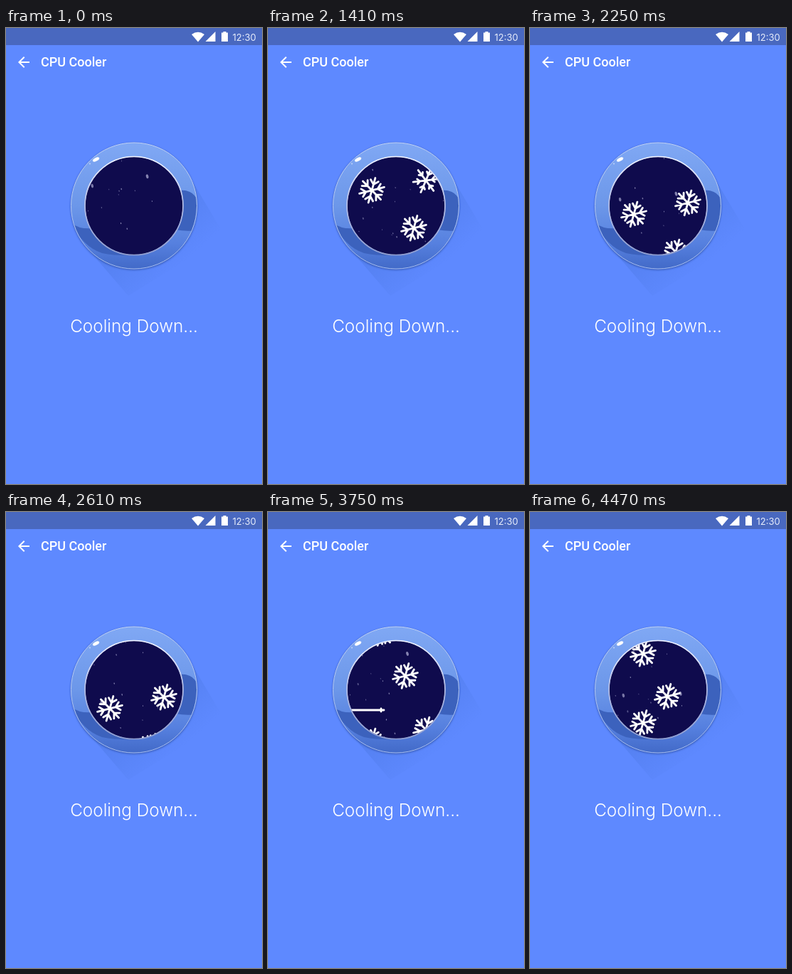
Write an HTML page with a canvas that moves like this. It is 360 px wide and 640 px high and loops after 4.5 s.

```html
<!DOCTYPE html>
<html lang="en">
<head>
<meta charset="utf-8">
<title>CPU Cooler</title>
<style>
  html, body { margin: 0; width: 100%; height: 100%; overflow: hidden; background: #5e89ff; }
  svg, canvas { position: absolute; left: 0; top: 0; width: 360px; height: 640px; }
  text { fill: #fff; }
  .clock { font: 400 13px Inter, sans-serif; fill: #e6ecfb; }
  .title { font: 500 18px Roboto, sans-serif; }
  .state { font: 300 24.3px Inter, sans-serif; text-anchor: middle; }
</style>
</head>
<body>
<svg viewBox="0 0 360 640">
  <defs>
    <linearGradient id="shade" gradientUnits="userSpaceOnUse" x1="205" y1="275" x2="252" y2="328">
      <stop offset="0" stop-color="#4774dc" stop-opacity=".36"/>
      <stop offset="1" stop-color="#4774dc" stop-opacity="0"/>
    </linearGradient>
    <linearGradient id="glass" x1="0" y1="0" x2="0" y2="1">
      <stop offset="0" stop-color="#80a8f4"/>
      <stop offset=".5" stop-color="#6c97e9"/>
      <stop offset=".8" stop-color="#5680df"/>
      <stop offset="1" stop-color="#426ac8"/>
    </linearGradient>
    <linearGradient id="edge" x1="0" y1="0" x2="0" y2="1">
      <stop offset="0" stop-color="#c2d4f6"/>
      <stop offset="1" stop-color="#a4bbee"/>
    </linearGradient>
    <clipPath id="dish"><circle cx="180" cy="249.5" r="88"/></clipPath>
    <filter id="soft"><feGaussianBlur stdDeviation=".7"/></filter>
    <filter id="drop" x="-10%" y="-10%" width="120%" height="120%"><feGaussianBlur stdDeviation="1.2"/></filter>
  </defs>
  <rect width="360" height="640" fill="#5e89ff"/>
  <rect width="360" height="24" fill="#4968bf"/>
  <g fill="#fff">
    <path d="M261 9Q270 2.500 279 9L270 19.500Z"/>
    <path d="M294.500 5V19H280.500Z"/>
    <path d="M303 6.500h2.500V5h4v1.500h2.500V19h-9Z"/>
    <path transform="translate(13 36)" d="M20 11H7.830l5.590-5.590L12 4l-8 8 8 8 1.410-1.410L7.830 13H20z"/>
  </g>
  <text class="clock" x="318.500" y="18">12:30</text>
  <text class="title" x="49" y="54">CPU Cooler</text>
  <path d="M250 195L308 292L172 376L116 311Z" fill="url(#shade)"/>
  <circle cx="180" cy="250.500" r="89.500" fill="#2c4c9c" opacity=".6" filter="url(#drop)"/>
  <circle cx="180" cy="249.500" r="88.500" fill="url(#glass)"/>
  <g clip-path="url(#dish)" fill="#3c62bd">
    <path d="M92 274Q104 283 122 281L180 319Q155 320 135 316Q108 307 92 274Z"/>
    <path d="M243 228Q264 226 270 244V284Q255 286 238 283Z"/>
  </g>
  <circle cx="180" cy="249.500" r="88.500" fill="none" stroke="url(#edge)"/>
  <g fill="#fff" filter="url(#soft)">
    <ellipse cx="126.500" cy="184.500" rx="5" ry="2.400" transform="rotate(-28 126.500 184.500)"/>
    <circle cx="118" cy="190.500" r=".9" opacity=".6"/>
  </g>
  <text class="state" x="180" y="427">Cooling Down...</text>
</svg>
<canvas id="view" width="360" height="640"></canvas>
<script>
const LOOP = 4500, CX = 180, CY = 249.5, R = 68.5, TAU = Math.PI * 2;
const FALL = 0.04, ARM = 18, TILT = -0.25, REACH = 62;
const ctx = document.getElementById('view').getContext('2d');

// side: where the streak enters from, 0 = falls in from above
const flakes = [
  { x: 205, y: 246, start: 540, side: 1 },
  { x: 146, y: 214, start: 1065, side: -1 },
  { x: 222, y: 214, start: 1465, side: 1 },
  { x: 193, y: 214, start: 3350, side: 1 },
  { x: 159, y: 278, start: 4020, side: -1 },
  { x: 159, y: 160, start: 3500, side: 0 }
];

let seed = 29;
const rand = () => (seed = (seed * 16807) % 2147483647) / 2147483647;
const specks = Array.from({ length: 22 }, () => {
  const size = 0.6 + 2.2 * rand() ** 4;
  return { x: 92 + rand() * 148, y: rand() * 150, size, speed: 0.025 + size * 0.025, alpha: 0.35 + rand() * 0.3 };
});

const ramp = (t, a, b) => Math.max(0, Math.min(1, (t - a) / (b - a)));
const easeOut = p => 1 - (1 - p) ** 2.5;

function line(x0, y0, x1, y1) {
  ctx.moveTo(x0, y0);
  ctx.lineTo(x1, y1);
}

function drawSpeck({ x, y, size, speed, alpha }, t) {
  const drop = (y + speed * t) % 150;
  ctx.globalAlpha = alpha;
  ctx.beginPath();
  ctx.ellipse(x + drop * 0.28, 174 + drop, size * 0.85, size * 1.45, -0.25, 0, TAU);
  ctx.fill();
}

// A streak shoots in, its tail catches up, then arms and forks open.
function drawFlake({ x, y, start, side }, t) {
  const fallen = Math.max(0, t - start);
  const u = side ? t - start : fallen;
  if (u < -480 || t < start && !side) return;

  const tip = -REACH + (REACH + ARM) * easeOut(ramp(u, -480, -60));
  const tail = -REACH + (REACH - ARM) * ramp(u, -200, -20);
  const arm = ARM * ramp(u, -290, -100);
  const fan = Math.PI / 2 - ramp(u, -225, -60) * Math.PI / 6;
  const fork = 8 * ramp(u, -140, 0);

  ctx.save();
  ctx.translate(x, y + fallen * FALL);
  ctx.rotate(TILT * ramp(u, -150, 50));
  if (side > 0) ctx.scale(-1, 1);
  ctx.beginPath();
  line(tail, 0, tip, 0);
  for (const a of [0, fan, Math.PI - fan, Math.PI, Math.PI + fan, -fan]) {
    const c = Math.cos(a), s = Math.sin(a);
    if (arm && Math.abs(s) > 0.01) line(0, 0, c * arm, s * arm);
    if (!fork) continue;
    for (const b of [a - 0.78, a + 0.78])
      line(c * 8.5, s * 8.5, c * 8.5 + Math.cos(b) * fork, s * 8.5 + Math.sin(b) * fork);
  }
  ctx.stroke();
  ctx.restore();
}

const rim = ctx.createLinearGradient(0, CY - R, 0, CY + R);
rim.addColorStop(0, '#f4f6ff');
rim.addColorStop(0.5, '#b4bde4');
rim.addColorStop(1, '#929fcf');

function draw(t) {
  ctx.clearRect(0, 0, 360, 640);
  ctx.save();
  ctx.beginPath();
  ctx.arc(CX, CY, R, 0, TAU);
  ctx.fillStyle = '#0f0b4d';
  ctx.fill();
  ctx.clip();

  ctx.fillStyle = '#d3d3f2';
  for (const s of specks) drawSpeck(s, t);

  ctx.globalAlpha = 1;
  ctx.strokeStyle = '#fff';
  ctx.lineWidth = 2.8;
  ctx.lineCap = 'round';
  for (const f of flakes) drawFlake(f, t);
  ctx.restore();

  ctx.beginPath();
  ctx.arc(CX, CY, R + 0.5, 0, TAU);
  ctx.strokeStyle = rim;
  ctx.lineWidth = 1.7;
  ctx.stroke();
}

const began = performance.now();
function frame() {
  draw((performance.now() - began) % LOOP);
  requestAnimationFrame(frame);
}
frame();
</script>
</body>
</html>
```
